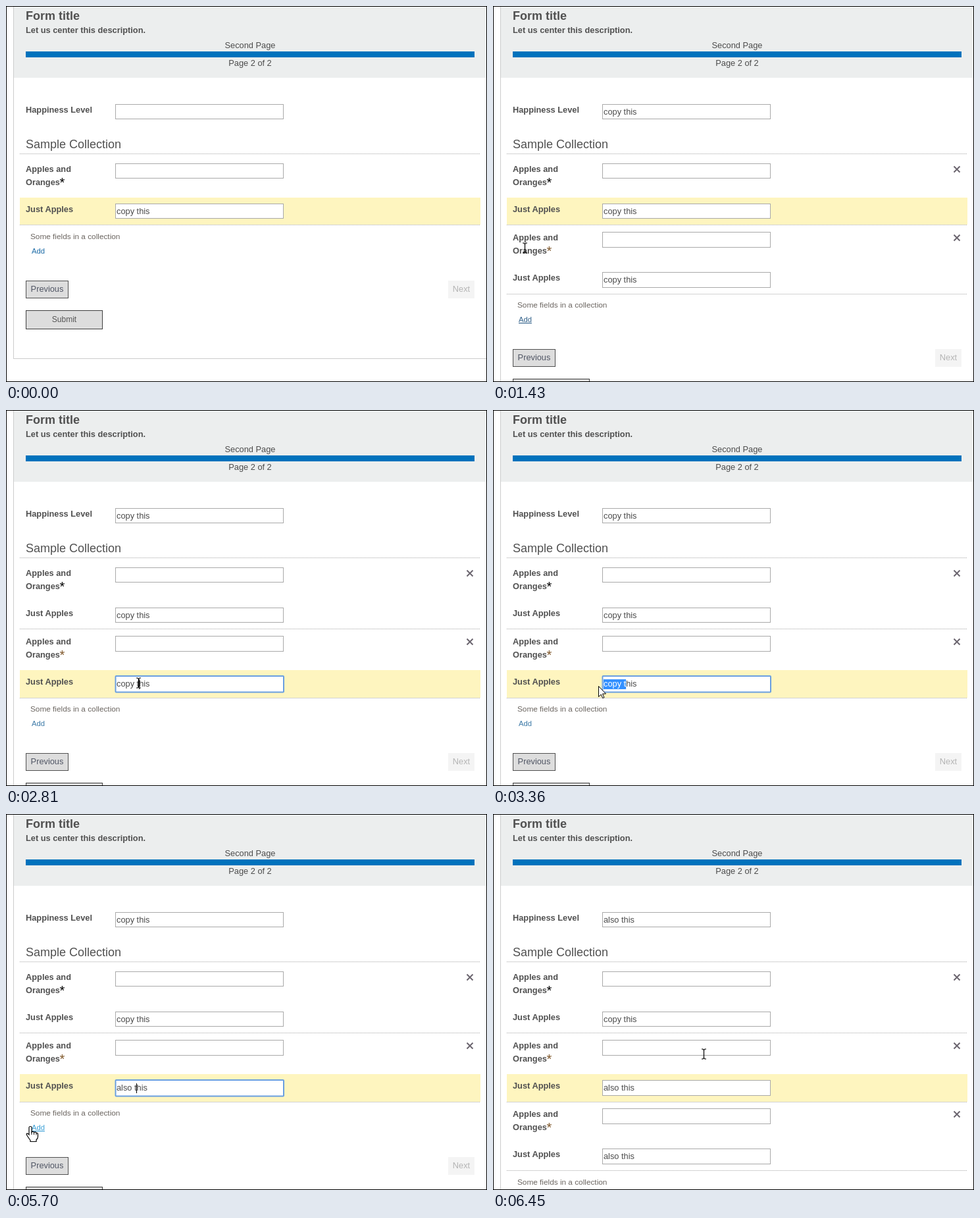
These frames come from a looping animation (731 by 571 pixels, 6.54 s). An HTML page:

```html
<!DOCTYPE html>
<html lang="en">
<head>
<meta charset="utf-8">
<title>Form</title>
<style>
html, body { margin: 0; width: 100%; height: 100%; overflow: hidden; background: #fff; }
svg { display: block; width: 731px; height: 571px; }
text { font-family: "Liberation Sans", Arial, sans-serif; white-space: pre; }
</style>
</head>
<body>
<svg id="stage" viewBox="0 0 731 571"></svg>
<script>
const LOOP = 6540, SIZE = 12.8, PITCH = 104;
const stage = document.getElementById('stage');
const pen = document.createElement('canvas').getContext('2d');
pen.font = SIZE + 'px "Liberation Sans", Arial, sans-serif';
const widthOf = s => pen.measureText(s).width;

// Bursts of motion: first step, last step, number of steps
const bursts = [
  [0, 0, 1], [120, 720, 9], [810, 960, 3], [1110, 1110, 1], [1340, 1430, 2],
  [1890, 2200, 5], [2360, 2660, 5], [2810, 3360, 8], [4070, 4140, 2],
  [4290, 4290, 1], [4480, 4480, 1], [4630, 4630, 1], [5150, 5760, 9], [5850, 6450, 9]
];

// Pointer: time, x, y, shape
const path = [
  [120, 509, 524, 'arrow'], [270, 400, 440, 'arrow'], [420, 262, 374, 'arrow'],
  [570, 158, 349, 'beam'], [645, 118, 349, 'beam'], [720, 81, 371, 'arrow'],
  [885, 52, 367, 'hand'], [960, 46, 366, 'hand'], [1430, 48, 367, 'beam'],
  [1812, 48, 367, 'beam'], [1967, 115, 385, 'arrow'], [2122, 208, 409, 'beam'],
  [2200, 229, 413, 'beam'], [2285, 229, 413, 'beam'], [2435, 219, 416, 'beam'],
  [2510, 210, 409, 'beam'], [2660, 201, 414, 'beam'], [2810, 201, 414, 'beam'],
  [3203, 171, 418, 'beam'], [3281, 164, 419, 'arrow'], [3360, 160, 419, 'arrow'],
  [5074, 160, 419, 'arrow'], [5303, 100, 455, 'beam'], [5379, 60, 470, 'arrow'],
  [5531, 13, 483, 'arrow'], [5607, 20, 481, 'arrow'], [5684, 37, 474, 'hand'],
  [5760, 44, 473, 'hand'], [5925, 44, 473, 'hand'], [6000, 44, 473, 'beam'],
  [6150, 125, 440, 'arrow'], [6225, 180, 415, 'beam'], [6300, 235, 393, 'arrow'],
  [6375, 285, 374, 'arrow'], [6450, 320, 364, 'beam']
];

// What has been typed over the selection
const typed = [[4070, 'a'], [4140, 'al'], [4290, 'also'], [4480, 'also '], [4630, 'also t']];

const shapes = {
  arrow: '<path d="M.5.5V16.5L4.2 13L6.8 18.6L9 17.6L6.5 12H11.5Z" fill="#fff" stroke="#000"/>',
  beam: '<path d="M-3-7H-1L.5-5.5L2-7H4M.5-5.5V6.5M-3 8H-1L.5 6.5L2 8H4" fill="none" stroke="#000" stroke-width="1.2"/>',
  hand: '<path d="M-2 13V2Q-2 .5 0 .5T2 2V9Q4 7 5.5 9.5Q8 7.8 9 10.5Q11.5 9.5 11.5 13V16Q11.5 19 9 21V23.5H0V21.5Q-2 19-4.5 15Q-6.5 12-5.5 11.3Q-4 10.5-2 13Z" fill="#fff" stroke="#000" stroke-width="1.2"/>' +
    '<path d="M2 9V13M5.5 9.5V13M9 10.5V13.5" stroke="#000"/>'
};

const rect = (x, y, w, h, fill) =>
  `<rect x="${x}" y="${y}" width="${w}" height="${h}" fill="${fill}"/>`;
const box = (x, y, w, h, fill, line) =>
  `<rect x="${x + .5}" y="${y + .5}" width="${w - 1}" height="${h - 1}" fill="${fill}" stroke="${line}"/>`;
const text = (x, y, s, size = SIZE, fill = '#4c4c4c', more = '') =>
  `<text x="${x}" y="${y}" font-size="${size}" fill="${fill}" ${more}>${s}</text>`;
const bold = (x, y, s, size) => text(x, y, s, size, '#505050', 'font-weight="700"');
const mid = (x, y, s, size, fill) => text(x, y, s, size, fill, 'text-anchor="middle"');
const dots = y =>
  `<path d="M21 ${y + .5}H721" stroke="#a8a8a8" stroke-dasharray="1 1"/>`;
const last = (list, t) => list.filter(k => k[0] <= t).pop();

function snap(t) {
  const [a, b, n] = last(bursts, t);
  if (n < 2) return a;
  const step = (b - a) / (n - 1);
  return Math.round(a + step * Math.min(n - 1, Math.floor((t - a) / step + .01)));
}

function pointer(t) {
  const i = path.findLastIndex(k => k[0] <= t);
  if (i < 0) return null;
  const [t0, x0, y0, shape] = path[i], [t1, x1, y1] = path[i + 1] || path[i];
  const p = t1 > t0 ? (t - t0) / (t1 - t0) : 0;
  return { x: Math.round(x0 + (x1 - x0) * p), y: Math.round(y0 + (y1 - y0) * p), shape };
}

function field(y, h, value) {
  return box(166, y, 256, h, '#fff', '#a9a9a9') + text(168, y + 16, value);
}

// The focused field, with its selection or caret
function activeField(y, t, at) {
  let out = `<rect x="166.5" y="${y}" width="255.5" height="24.5" rx="1" fill="#fff" stroke="#6a9fe0" stroke-width="2"/>`;
  const entry = last(typed, t);
  let head = entry ? entry[1] : 'copy t', from = head.length;
  if (!entry) {
    const gap = i => Math.abs(168 + widthOf(head.slice(0, i)) - at.x);
    for (let i = from; i >= 0; i--) if (gap(i) < gap(from)) from = i;
  }
  const x0 = 168 + widthOf(head.slice(0, from)), x1 = 168 + widthOf(head);
  if (from < head.length) {
    out += rect(x0, y + 5, x1 - x0, 15, '#3390ff');
    head = `${head.slice(0, from)}<tspan fill="#fff">${head.slice(from)}</tspan>`;
  }
  out += text(168, y + 16, head + 'his');
  const blink = t >= 5150 && t < 5680;
  if (from === head.length && !blink) out += rect(Math.floor(x1), y + 5, 1, 15, '#000');
  return out;
}

function row(i, t, count, at) {
  const y = PITCH * i, h = i ? 24 : 23, end = 332 + Math.round(104.5 * i);
  const lit = i === (t < 2810 ? 0 : 1), active = i === 1 && t >= 2810 && t < 5850;
  const value = i === 0 || (i === 1 && t < 4070) ? 'copy this' : 'also this';
  return (lit ? rect(21, 291 + y, 700, end - 291 - y, '#fef5bf') : '') +
    bold(30, 252 + y, 'Apples and') + bold(30, 272 + y, 'Oranges') +
    text(81.5, 275 + y, '*', 20, i ? '#80592c' : '#000') +
    field(239 + y, h, '') +
    bold(30, 313 + y, 'Just Apples') +
    (active ? activeField(300 + y, t, at) : field(300 + y, h, value)) +
    (count > 1 ? `<path d="M700.5 ${243.5 + y}l9 9m0-9l-9 9" stroke="#6c6670" stroke-width="2"/>` : '') +
    dots(end);
}

function addLink(y, t, at) {
  const hover = at && at.shape === 'hand' && (t < 1110 || t >= 5680);
  const focus = t >= 1110 && t < 2810;
  const fill = hover ? '#3a9fd6' : focus ? '#2f5f88' : t < 1110 ? '#1a6aa6' : '#3a78a6';
  return text(39, y, 'Add', 11.2, fill, hover || focus ? 'text-decoration="underline"' : '');
}

function footer(y, t, at) {
  return text(37, 354 + y, 'Some fields in a collection', 11.8, '#6b6560') +
    addLink(376 + y, t, at) +
    box(30, 417 + y, 65, 27, '#dddddd', '#505050') + mid(62.5, 434 + y, 'Previous', SIZE, '#505564') +
    rect(672, 417 + y, 40, 27, '#f4f4f4') + mid(692, 434 + y, 'Next', SIZE, '#b4b4b4') +
    box(30, 462 + y, 117, 29, '#dddddd', '#404040') + mid(88.5, 480 + y, 'Submit', 12, '#555') +
    rect(11, 535 + y, 719, 1, '#cccccc');
}

function draw(t) {
  const count = t < 1340 ? 1 : t < 5925 ? 2 : 3;
  const at = pointer(t), shift = Math.floor(104.5 * (count - 1));
  let out = rect(0, 0, 731, 571, '#fff') +
    rect(11, 1, 719, 108, '#eceeee') +
    rect(11, 1, 1, 535 + shift, '#cccccc') +
    bold(30, 21, 'Form title', 18) +
    bold(30, 41, 'Let us center this description.') +
    mid(371, 64, 'Second Page') +
    rect(30, 69, 682, 9, '#0072bc') +
    mid(371, 91, 'Page 2 of 2') +
    bold(30, 162, 'Happiness Level') +
    field(149, 23, ['', 'copy this', 'also this'][count - 1]) +
    text(30, 216, 'Sample Collection', 18, '#505050') + dots(224);
  for (let i = 0; i < count; i++) out += row(i, t, count, at);
  out += footer(shift, t, at);
  if (at) out += `<g transform="translate(${at.x} ${at.y})">${shapes[at.shape]}</g>`;
  stage.innerHTML = out + box(0, 0, 731, 571, 'none', '#000');
}

let shown = -1;
function tick() {
  const t = snap(performance.now() % LOOP);
  if (t !== shown) draw(shown = t);
  requestAnimationFrame(tick);
}
tick();
</script>
</body>
</html>
```
